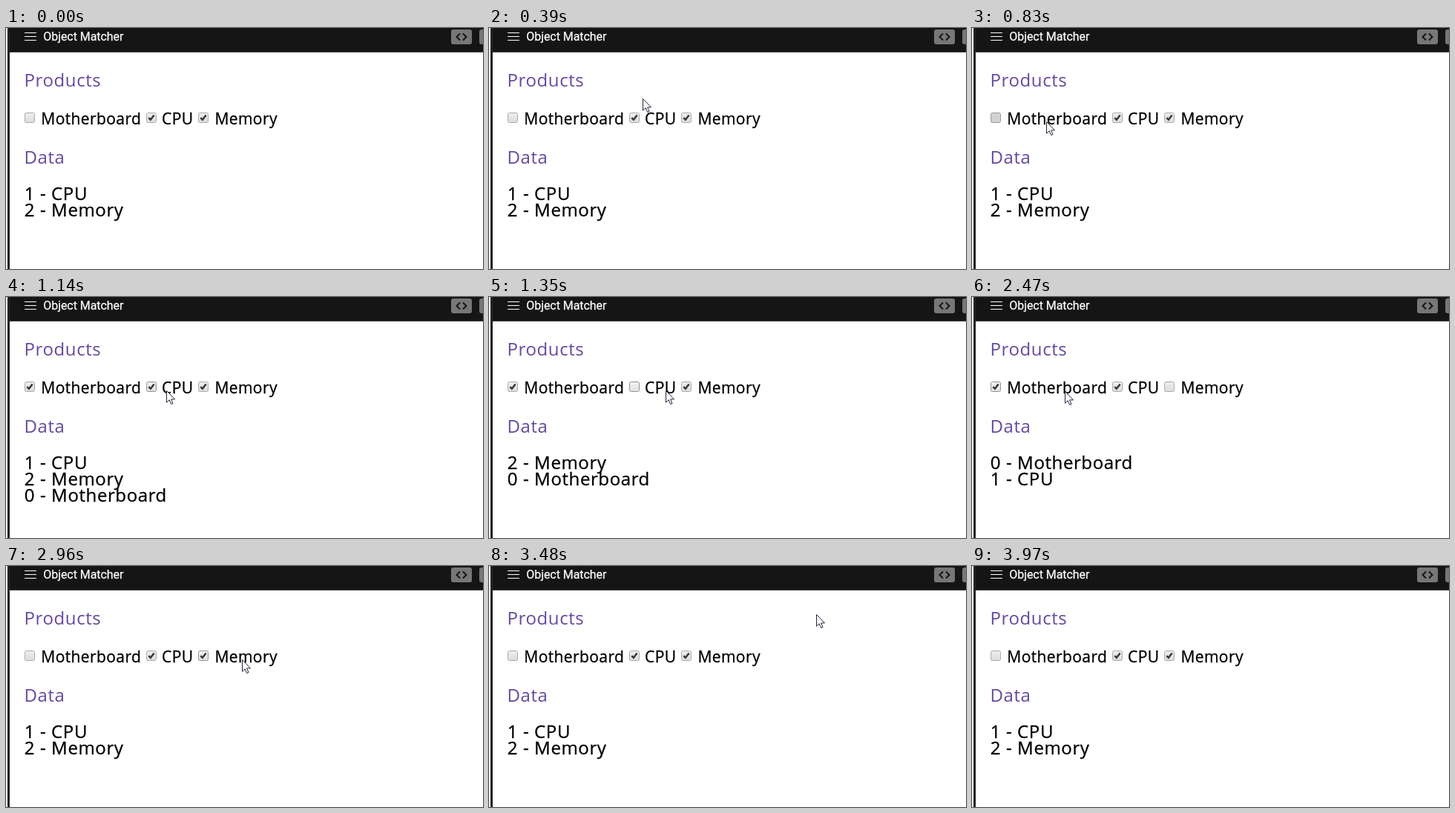
Write an HTML page that moves like this. It is 643 px wide and 325 px high and loops after 5.06 s.

```html
<!DOCTYPE html>
<html lang="en">
<head>
<meta charset="utf-8">
<title>Object Matcher</title>
<style>
  html, body { margin: 0; width: 100%; height: 100%; overflow: hidden; background: #fff; }
  svg { display: block; }
  text { font-family: "Open Sans", "Noto Sans", sans-serif; white-space: pre; }
  .title { font: 16px Roboto, sans-serif; letter-spacing: -.06px; fill: #fff; stroke: #fff; stroke-width: .25; }
  .heading, .row { font-size: 24px; letter-spacing: .6px; }
  .heading { fill: #65499d; }
  .label { font-size: 21px; letter-spacing: .4px; }
  .row, .label { stroke: #000; stroke-width: .3; }
  .box rect { fill: url(#idle); stroke: #aaa; }
  .box.hover rect { fill: url(#over); stroke: #929292; }
  .box.pressed rect { fill: #d3d3d3; stroke: #999; }
  .box path { fill: none; stroke: #363636; stroke-width: 2.5; visibility: hidden; }
  .box.checked path { visibility: visible; }
</style>
</head>
<body>
<svg width="643" height="325" viewBox="0 0 643 325">
  <defs>
    <linearGradient id="idle" x2="0" y2="1">
      <stop stop-color="#eee"/><stop offset="1" stop-color="#dcdcdc"/>
    </linearGradient>
    <linearGradient id="over" x2="0" y2="1">
      <stop stop-color="#f2f2f2"/><stop offset="1" stop-color="#e0e0e0"/>
    </linearGradient>
  </defs>
  <rect width="643" height="325" fill="#fff"/>
  <rect width="2" height="325" fill="#ededed"/>
  <rect x="2" width="3" height="325" fill="#222"/>
  <rect x="5" width="638" height="32" fill="#151515"/>
  <rect x="5" y="32" width="638" height="1" fill="#444"/>
  <path d="M25 6.5H41M25 11.5H41M25 16.5H41" stroke="#fff"/>
  <text class="title" x="50.3" y="17">Object Matcher</text>
  <rect x="600" y="2" width="28" height="20" rx="3" fill="#777"/>
  <rect x="638" y="2" width="28" height="20" rx="3" fill="#777"/>
  <path d="M612 7.5L607.5 12L612 16.5M616 7.5L620.5 12L616 16.5" fill="none" stroke="#151515" stroke-width="2"/>

  <text class="heading" x="24.5" y="79">Products</text>
  <g id="options"></g>
  <text class="heading" x="24.5" y="183">Data</text>
  <text class="row" x="24.8" y="232"></text>
  <text class="row" x="24.8" y="254"></text>
  <text class="row" x="24.8" y="276"></text>
  <path id="cursor" d="M.5 .5V16.2L4.2 12.8L6.6 18.5L9 17.5L6.6 11.9H11.5Z" fill="#fff" stroke="#25233a"/>
</svg>
<script>
  const LOOP = 5060, STEP = 70;
  const products = [
    { name: 'Motherboard', box: 25, text: 47.3, end: 182 },
    { name: 'CPU', box: 189, text: 210, end: 252 },
    { name: 'Memory', box: 259, text: 281.4, end: 366 }
  ];

  // Selected product ids, in the order they are listed.
  const selections = [
    [0, '12'], [930, '120'], [1350, '20'], [1700, '0'],
    [2190, '01'], [2610, '1'], [2960, '12']
  ];
  const presses = [[830, 930], [1280, 1350], [1630, 1700], [2050, 2190], [2540, 2610], [2890, 2960]];

  const smooth = p => p * p * (3 - 2 * p);
  const linear = p => p;
  const slowDown = p => 1 - (1 - p) ** 2;

  // Time, x, y and the easing towards the next stop.
  const stops = [
    [110, 527, 3, slowDown], [670, 100, 126], [930, 100, 126], [1210, 238, 126],
    [1350, 238, 126], [1560, 304, 126], [1700, 304, 126], [1910, 241, 117, linear],
    [1980, 242, 118], [2190, 242, 118], [2470, 125, 127], [2610, 125, 127],
    [2820, 318, 126], [3200, 318, 126], [3760, 564, 4, slowDown], [3900, 581, 0], [3970, 581, 0]
  ];

  const options = document.getElementById('options');
  const cursor = document.getElementById('cursor');
  const rows = document.querySelectorAll('.row');

  options.innerHTML = products.map(p => `
    <g class="box" transform="translate(${p.box} 114)">
      <rect x=".5" y=".5" width="13" height="13" rx="2"/>
      <path d="M3.3 7.2L5.9 9.7L10.6 3.6"/>
    </g>
    <text class="label" x="${p.text}" y="130">${p.name}</text>`).join('');
  const boxes = options.querySelectorAll('.box');

  function quantize(t) {
    const start = [3270, 930, 830, 110, 0].find(s => t >= s);
    return start + Math.floor((t - start) / STEP) * STEP;
  }

  function cursorAt(t) {
    const i = stops.findIndex(s => s[0] > t);
    if (i < 1) return null;
    const [t0, x0, y0, ease = smooth] = stops[i - 1];
    const [t1, x1, y1] = stops[i];
    const p = ease((t - t0) / (t1 - t0));
    return { x: Math.round(x0 + (x1 - x0) * p), y: Math.round(y0 + (y1 - y0) * p) };
  }

  function render(time) {
    const t = quantize(time);
    const point = cursorAt(t);
    const selected = selections.filter(s => s[0] <= t).pop()[1];
    const pressing = presses.some(([a, b]) => t >= a && t < b);

    cursor.style.display = point ? '' : 'none';
    if (point) cursor.setAttribute('transform', `translate(${point.x} ${point.y})`);

    products.forEach((p, i) => {
      const hover = point && point.x >= p.box && point.x <= p.end && point.y >= 110 && point.y <= 138;
      boxes[i].classList.toggle('checked', selected.includes(i));
      boxes[i].classList.toggle('hover', !!hover);
      boxes[i].classList.toggle('pressed', !!hover && pressing);
    });
    rows.forEach((row, i) => {
      const id = selected[i];
      row.textContent = id ? `${id} - ${products[id].name}` : '';
    });
  }

  const began = performance.now();
  function tick() {
    render((performance.now() - began) % LOOP);
    requestAnimationFrame(tick);
  }
  tick();
</script>
</body>
</html>
```
